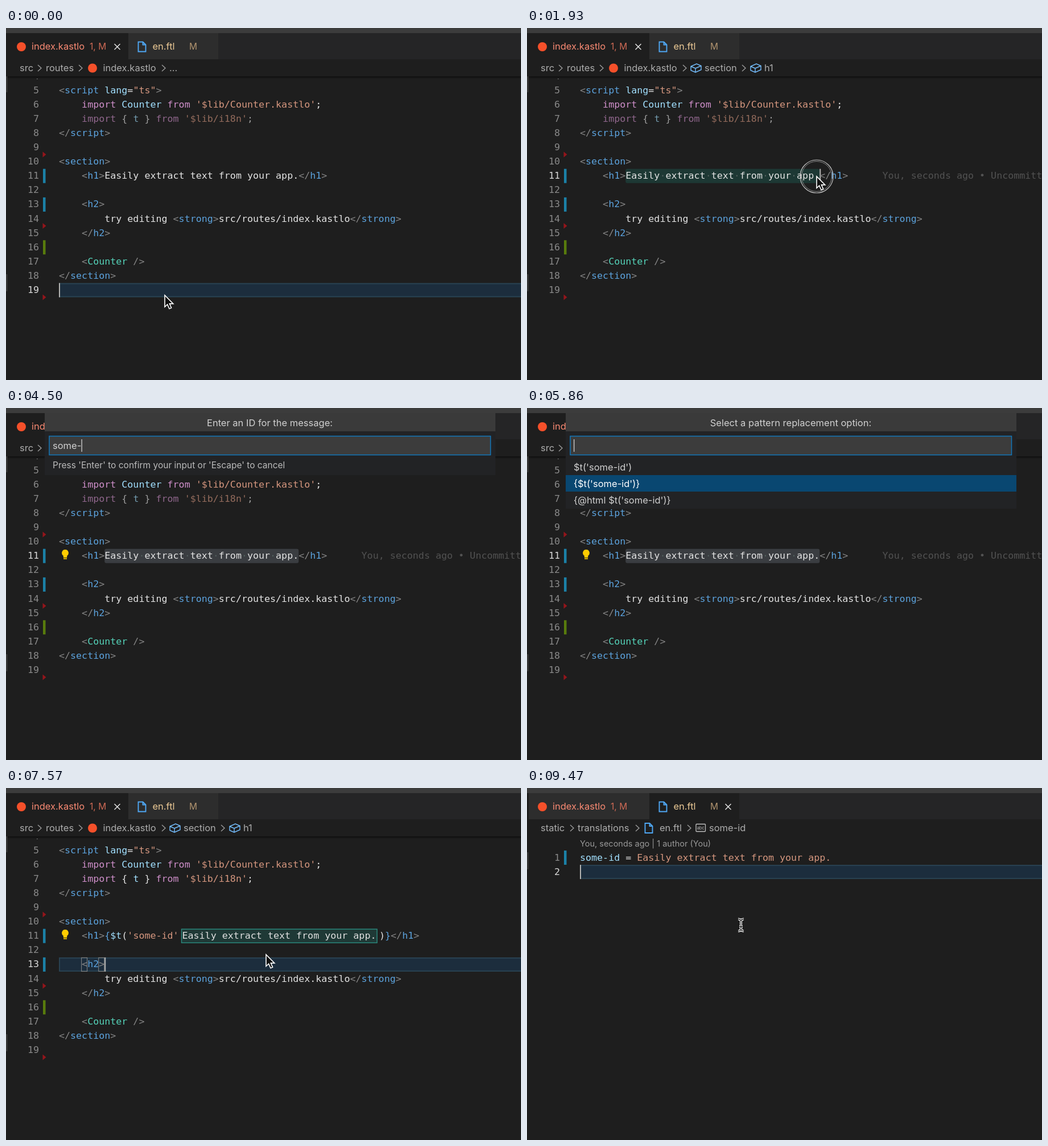
Animation of 905x619 px, one loop 9.57 s. Source, as an HTML page:

```html
<!DOCTYPE html>
<html lang="en">
<head>
<meta charset="utf-8">
<title>Editor: extract text</title>
<style>
  html, body { margin: 0; width: 100%; height: 100%; overflow: hidden; background: #1e1e1e; }
  svg { display: block; width: 905px; height: 619px; }
  text { white-space: pre; font: 16.5px Inter, sans-serif; }
  .code { font: 16.66px "DejaVu Sans Mono", monospace; }
</style>
</head>
<body>
<svg id="stage" viewBox="0 0 905 619" xmlns="http://www.w3.org/2000/svg"></svg>
<script>
const stage = document.getElementById('stage');
const LOOP = 9570, CHAR = 10.03, LEFT = 93, LINE = 25.1;
const SENTENCE = 'Easily extract text from your app.';
const BLAME = 'You, seconds ago • Uncommitted changes';

// Moments of the story, in ms
const T = {
  press: 800, drag: 930, release: 1950, bulb: 2300, menu: 2500, menuEnd: 2860,
  askId: 3040, pick: 4980, pickSecond: 5350, replaced: 5930, hint: 6210,
  blameBack: 6500, clickH2: 7400, tab: 8140, lens: 8700, clickLine2: 9140
};
const KEYS_TYPED = [4070, 4140, 4210, 4360, 4500, 4640, 4790];
const PRESSES = [[T.press, T.release], [7350, 7480], [8040, 8180], [T.clickLine2, 9260]];
const MOUSE = [
  [0, 279, 470], [70, 279, 470], [760, 176, 260], [930, 176, 260], [1000, 206, 259],
  [1900, 509, 261], [6900, 509, 261], [7330, 461, 307], [7420, 461, 307], [7570, 457, 293],
  [8020, 285, 36], [8140, 285, 36], [8360, 271, 105], [9100, 318, 234], [9230, 318, 234],
  [9440, 376, 241], [LOOP, 376, 241]
];

const COLOR = {
  g: '#858585', b: '#5ca3de', v: '#a2e0ff', w: '#e4e4e4', s: '#d6977f', k: '#cf8fca', t: '#55d3b9'
};

// Each line: indent in columns, then colour key and text in turn
const PAGE = {
  5: [0, 'g', '<', 'b', 'script', 'v', ' lang', 'w', '=', 's', '"ts"', 'g', '>'],
  6: [4, 'k', 'import', 'v', ' Counter', 'k', ' from', 's', " '$lib/Counter.kastlo'", 'w', ';'],
  7: [4, 'k', 'import', 'w', ' { ', 'v', 't', 'w', ' }', 'k', ' from', 's', " '$lib/i18n'", 'w', ';'],
  8: [0, 'g', '</', 'b', 'script', 'g', '>'],
  10: [0, 'g', '<', 'b', 'section', 'g', '>'],
  13: [4, 'g', '<', 'b', 'h2', 'g', '>'],
  14: [8, 'w', 'try editing ', 'g', '<', 'b', 'strong', 'g', '>', 'w', 'src/routes/index.kastlo',
    'g', '</', 'b', 'strong', 'g', '>'],
  15: [4, 'g', '</', 'b', 'h2', 'g', '>'],
  17: [4, 'g', '<', 't', 'Counter', 'g', ' />'],
  18: [0, 'g', '</', 'b', 'section', 'g', '>']
};
const H1_OPEN = ['g', '<', 'b', 'h1', 'g', '>'];
const H1_CLOSE = ['g', '</', 'b', 'h1', 'g', '>'];

const esc = s => s.replace(/&/g, '&amp;').replace(/</g, '&lt;');
const rect = (x, y, w, h, fill, extra = '') =>
  `<rect x="${x}" y="${y}" width="${w}" height="${h}" fill="${fill}" ${extra}/>`;
const path = (d, stroke, width = 1.4, fill = 'none') =>
  `<path d="${d}" stroke="${stroke}" stroke-width="${width}" fill="${fill}"/>`;
const label = (x, y, s, fill, size = 16.5, extra = '') =>
  `<text x="${x}" y="${y}" fill="${fill}" style="font-size:${size}px" ${extra}>${esc(s)}</text>`;
const baseline = mid => mid + 5;
const mono = (x, mid, s, fill, extra = '') =>
  `<text class="code" x="${x}" y="${baseline(mid)}" fill="${fill}" ${extra}>${esc(s)}</text>`;
const at = (x, y, inner) => `<g transform="translate(${x} ${y})">${inner}</g>`;
const between = (t, a, b) => t >= a && t < b;
const column = n => LEFT + n * CHAR;
const pageY = n => 461 + (n - 19) * LINE;
const fileY = n => 122.5 + (n - 1) * LINE;

function runs(x, mid, parts, extra = '') {
  let spans = '';
  for (let i = 0; i < parts.length; i += 2)
    spans += `<tspan fill="${COLOR[parts[i]]}">${esc(parts[i + 1])}</tspan>`;
  return `<text class="code" x="${x}" y="${baseline(mid)}" ${extra}>${spans}</text>`;
}

const lineNumber = (n, mid, active) =>
  mono(58, mid, String(n), active ? '#dadada' : '#8a8a8a', 'text-anchor="end"');
const caret = (x, mid) => rect(x, mid - 12.5, 2, 25, '#b4b4b2');
const currentLine = mid =>
  rect(94, mid - 11.5, 815, 23, '#1c2d3d', 'stroke="#294252" stroke-width="2"');
const bracket = (col, mid) =>
  rect(column(col) - .5, mid - 12, 10, 24, 'none', 'stroke="#888"');
const changeBar = (mid, fill) => rect(65, mid - 12.5, 4.5, 25, fill);
const chevron = x => path(`M${x - 3} 65l6 5.5l-6 5.5`, '#a0a0a0', 1.3);
const cross = x => path(`M${x - 5} 28l10 10m0-10l-10 10`, '#e4e4e4', 1.5);
const logo = (x, y) => `<circle cx="${x}" cy="${y}" r="8" fill="#f5502a"/>`;
const fileIcon = (x, y) =>
  at(x, y, path('M-6.5-8.5H1.5L6.5-3.5V8.5H-6.5ZM1.5-8.5V-3.5H6.5', '#4fa8f5', 1.9));
const cube = x =>
  at(x, 70.5, path('M-9-3L1-7.5L9-4V3L-1 7.5L-9 4ZM-9-3L-1 0.5L9-4M-1 .5V7.5', '#75beff', 1.4));
const bulb = (x, y) => at(x, y,
  '<path d="M0-8.5a6 6 0 0 0-3.2 11V5.5h6.4V2.5A6 6 0 0 0 0-8.5Z" fill="#ffcc00"/>' +
  rect(-3, 6.3, 6, 2.2, '#e0b400'));

function mouseAt(t) {
  let i = 1;
  while (i < MOUSE.length - 1 && MOUSE[i][0] <= t) i++;
  const [t0, x0, y0] = MOUSE[i - 1], [t1, x1, y1] = MOUSE[i];
  const p = Math.max(0, Math.min(1, (t - t0) / (t1 - t0)));
  const e = p * p * (3 - 2 * p);
  return [x0 + (x1 - x0) * e, y0 + (y1 - y0) * e];
}

// Number of characters covered by the drag; painting trails the pointer
function selectedCount(t) {
  const reach = Math.round((mouseAt(t - 40)[0] + 1 - column(8)) / CHAR);
  return Math.max(0, Math.min(SENTENCE.length, reach));
}

function headingLine(t) {
  const y = pageY(11), x = column(4), textX = column(8);
  let out = '';
  if (t < T.replaced) {
    if (t >= T.drag) {
      const count = selectedCount(t), focused = t < T.askId;
      out += rect(textX, y - 12.5, count * CHAR, 25, focused ? '#1d3834' : '#3a3d41', 'rx="3"');
      out += mono(textX, y, SENTENCE.slice(0, count).replace(/\S/g, ' ').replace(/ /g,
        (_, i) => SENTENCE[i] === ' ' ? '·' : ' '), '#53615f');
      if (focused) out += caret(textX + count * CHAR, y);
    } else if (t >= T.press) out += caret(textX, y);
    out += runs(x, y, [...H1_OPEN, 'w', SENTENCE, ...H1_CLOSE]);
    if (between(t, T.press, 1070)) out += bracket(4, y) + bracket(7, y);
    if (t >= T.press + 70) out += mono(column(53), y, BLAME, '#525252');
  } else {
    const call = [...H1_OPEN, 'b', '{', 'v', '$t', 'w', '(', 's', "'some-id'"];
    const tail = ['w', ')', 'b', '}', ...H1_CLOSE];
    const hinted = t >= T.hint;
    const tailX = hinted ? 656 : column(21);
    if (t < T.clickH2)
      out += rect(textX, y - 12.5, tailX + 2 * CHAR - textX, 25, '#1d3834', 'rx="3"') +
        caret(tailX + 2 * CHAR, y);
    out += runs(x, y, call) + runs(tailX, y, tail);
    if (hinted)
      out += rect(308.5, y - 12, 343.5, 24, '#1f3936', 'stroke="#2b8c80" stroke-width="1.4"') +
        mono(309.5, y - .4, SENTENCE, '#e0e0e0');
    if (between(t, T.blameBack, T.clickH2)) out += mono(786, y, BLAME, '#525252');
  }
  if (t >= T.bulb) out += bulb(104, 257.5);
  return out;
}

function pageEditor(t) {
  const active = t < T.press ? 19 : t < T.clickH2 ? 11 : 13;
  let out = rect(0, 85, 2.5, 28, '#393939') + rect(0, 433, 2.5, 30, '#393939');
  if (active !== 11) out += currentLine(pageY(active));
  for (let n = 4; n <= 19; n++) {
    out += lineNumber(n, pageY(n), n === active);
    if (!PAGE[n]) continue;
    const [indent, ...parts] = PAGE[n];
    out += runs(column(indent), pageY(n), parts, n === 7 && t < T.replaced ? 'opacity=".64"' : '');
  }
  out += headingLine(t);
  if (active === 19) out += caret(LEFT, pageY(19));
  if (active === 13) out += bracket(4, pageY(13)) + bracket(7, pageY(13)) + caret(column(8), pageY(13));
  out += changeBar(pageY(11), '#1b81a8') + changeBar(pageY(13), '#1b81a8') + changeBar(pageY(16), '#587c0c');
  for (const n of [9, 14, 19])
    out += `<path d="M64.5 ${pageY(n) + 7.5}l6 5l-6 5z" fill="#94151b"/>`;
  return out;
}

function fileEditor(t) {
  const active = t < T.clickLine2 ? 1 : 2;
  let out = rect(0, 113, 2.5, 30, '#393939') + currentLine(fileY(active));
  out += lineNumber(1, fileY(1), active === 1) + lineNumber(2, fileY(2), active === 2);
  out += changeBar(fileY(1), '#1b81a8');
  out += runs(LEFT, fileY(1), ['v', 'some-id', 'w', ' = ', 's', SENTENCE]);
  if (active === 1) out += mono(column(50), fileY(1), BLAME, '#4b5761');
  if (t >= T.lens) out += label(LEFT, 103, 'You, seconds ago | 1 author (You)', '#999', 14.5);
  return out + caret(LEFT, fileY(active));
}

function header(t) {
  const onFile = t >= T.tab, gray = '#acacac', tabY = 38, crumbY = 76;
  const crumb = (x, s) => label(x, crumbY, s, gray);
  let out = rect(0, 0, 905, 9, '#3c3c3c') + rect(3, 9, 902, 46, '#252526') + rect(3, 55, 902, 30, '#1e1e1e');
  out += rect(3, 9, 212, 46, onFile ? '#2d2d2d' : '#1e1e1e') + rect(215, 9, 158, 46, onFile ? '#1e1e1e' : '#2d2d2d');
  out += logo(27, 33) + label(45, tabY, 'index.kastlo', '#f98a73') + label(147, tabY, '1, M', '#cf6a55', 15.5);
  out += fileIcon(239, 33) + label(257.5, tabY, 'en.ftl', '#ecca96') + label(322, tabY, 'M', '#b39570', 15.5);
  out += cross(onFile ? 353.5 : 195.5);
  if (onFile) {
    out += crumb(24, 'static') + chevron(79) + crumb(89, 'translations') + chevron(194);
    out += fileIcon(214, 70.5) + crumb(233, 'en.ftl') + chevron(285);
    out += rect(297, 63.5, 16.5, 13, 'none', 'rx="1" stroke="#c0c0c0" stroke-width="1.3"') +
      label(305.2, 72.6, 'abc', '#c0c0c0', 7.5, 'text-anchor="middle"');
    return out + crumb(320, 'some-id');
  }
  out += rect(3, 85, 902, 2, '#121212') + rect(3, 87, 902, 2, '#191919');
  out += crumb(24, 'src') + chevron(59) + crumb(70, 'routes') + chevron(131);
  out += logo(152, 70.5) + crumb(170.5, 'index.kastlo') + chevron(277);
  if (t < T.press + 70) return out + crumb(287, '...');
  return out + cube(297) + crumb(312, 'section') + chevron(381) + cube(402) + crumb(417, 'h1');
}

function actionMenu() {
  return rect(173, 272.5, 210, 32, '#252526', 'stroke="#454545"') +
    rect(174, 277, 208, 23, '#094771') + label(196, 294, 'Extract text', '#fff', 15.5);
}

function dialog(t) {
  const picking = t >= T.pick;
  const title = picking ? 'Select a pattern replacement option:' : 'Enter an ID for the message:';
  let out = rect(68, 9, 792, picking ? 168 : 109, '#222325') + rect(68, 9, 792, 32, '#3a3a3a');
  out += label(463.5, 32, title, '#d0d0d0', 16.5, 'text-anchor="middle"');
  out += rect(76, 49.5, 775.5, 33, '#3c3c3c', 'stroke="#1177bb" stroke-width="1.5"');
  if (!picking) {
    const typed = 'some-id'.slice(0, KEYS_TYPED.filter(k => k <= t).length);
    const caretX = 82 + [0, 9, 19, 33.5, 43, 50.5, 55, 65][typed.length];
    out += label(82, 72, typed, '#d0d0d0');
    if (!between(t, 3710, 4070)) out += rect(caretX, 55, 1.3, 22, '#d4d4d4');
    return out + label(82, 106, "Press 'Enter' to confirm your input or 'Escape' to cancel", '#bbbbbb', 15.5);
  }
  out += rect(82, 55, 1.3, 22, '#d4d4d4');
  const chosen = t < T.pickSecond ? 0 : 1;
  out += rect(68, 89 + 29 * chosen, 792, 29, '#094771');
  ["$t('some-id')", "{$t('some-id')}", "{@html $t('some-id')}"].forEach((s, i) => {
    out += label(82, 109.5 + 29 * i, s, i === chosen ? '#fff' : '#d0d0d0');
  });
  return out;
}

function pointer(t) {
  if (between(t, T.askId, 6900)) return '';
  const [x, y] = mouseAt(t);
  let out = '';
  if (PRESSES.some(([a, b]) => between(t, a, b)))
    out += '<circle r="29" fill="none" stroke="#c4c4c4" stroke-width="1.2"/>' +
      '<circle r="26.5" fill="none" stroke="#8a8a8a" stroke-width="1"/>';
  if (t < 8200) out += path('M0 0V20.5L4.6 16.2L8 23.8L11.6 22.2L8.4 14.9H14.8Z', '#fff', 1.6, '#111');
  else {
    const beam = 'M-5-10.5Q0-10.5 0-6.5Q0-10.5 5-10.5M0-7V7M-5 10.5Q0 10.5 0 6.5Q0 10.5 5 10.5M-3 3H3';
    out += path(beam, '#fff', 4) + path(beam, '#111', 1.3);
  }
  return at(x.toFixed(1), y.toFixed(1), out);
}

function scene(t) {
  let out = rect(0, 0, 905, 619, '#1e1e1e');
  out += t < T.tab ? pageEditor(t) : fileEditor(t);
  out += header(t);
  if (between(t, T.menu, T.menuEnd)) out += actionMenu();
  if (between(t, T.askId, T.replaced)) out += dialog(t);
  return out + pointer(t);
}

let shown = '';
function frame() {
  const markup = scene(performance.now() % LOOP);
  if (markup !== shown) stage.innerHTML = shown = markup;
  requestAnimationFrame(frame);
}
frame();
</script>
</body>
</html>
```
